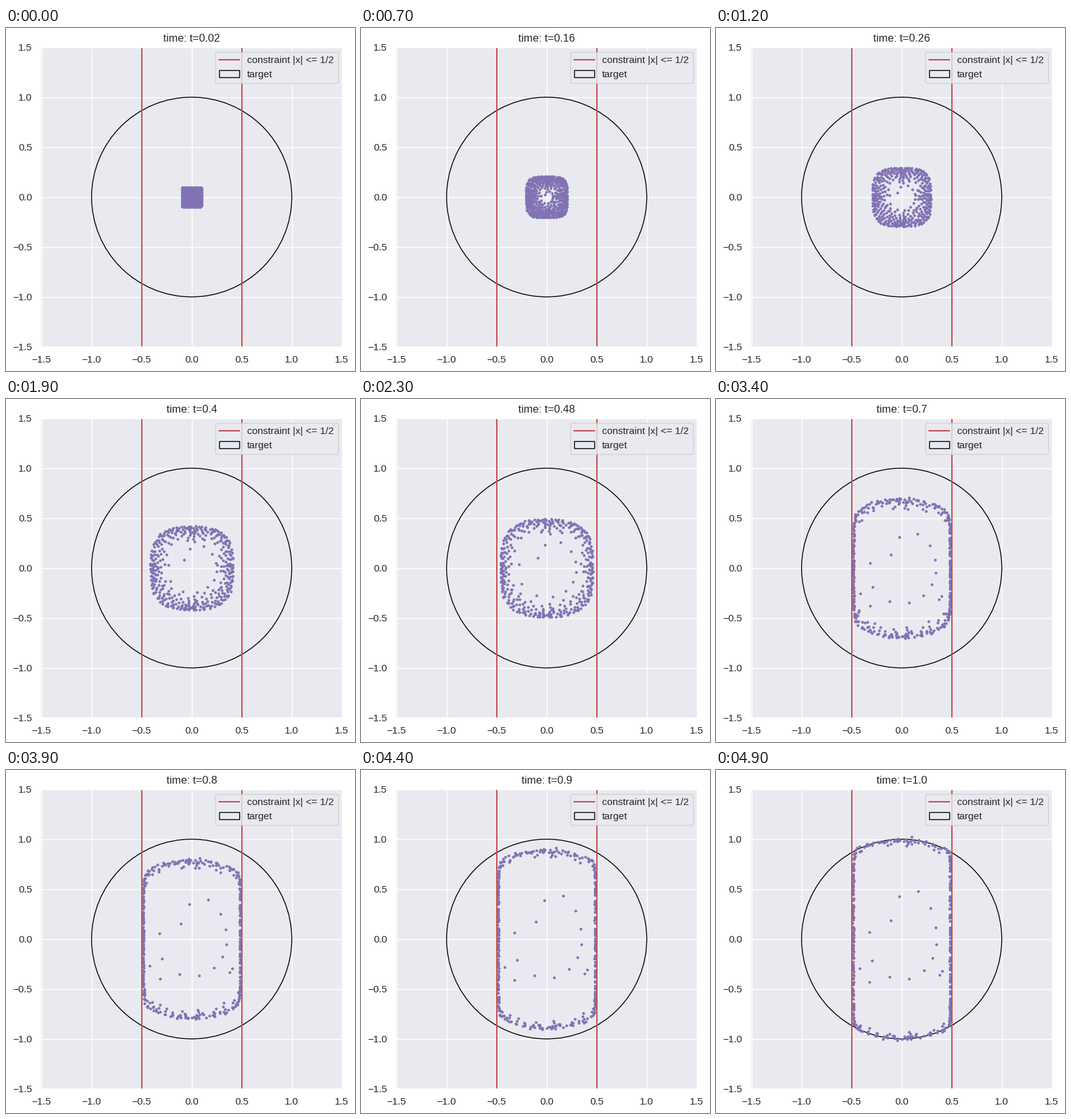
These frames come from a looping animation (537x529 px, 5000 ms). A matplotlib script:

```python
import numpy as np
import matplotlib.pyplot as plt
from matplotlib.animation import FuncAnimation

WIDTH, HEIGHT, DPI = 537, 529, 100
FRAMES, INTERVAL = 50, 100
INK, PANEL, RED, PURPLE = "#262626", "#E9EAF0", "#C44E52", "#8172B3"

plt.rcParams.update({
    "font.family": "Liberation Sans",
    "text.color": INK,
    "xtick.color": INK,
    "ytick.color": INK,
})

# Swarm: a 20 x 20 grid whose outer cells fan out into an expanding front.
side = np.linspace(-1, 1, 20)
gx, gy = (g.ravel() for g in np.meshgrid(side, side))
depth = np.maximum(abs(gx), abs(gy))
outer = depth > 0.2
depth, angle = depth[outer], np.arctan2(gy, gx)[outer]
rng = np.random.default_rng(7)
jitter = rng.normal(0, 1, depth.size)
turn = rng.normal(0, 0.03, depth.size) - 0.1 * np.sin(4 * angle)
lag = 1 + 0.2 * np.sin(5 * angle + 0.6)

# The 16 innermost cells lag behind: a dented ring of 12 and two wider pairs.
k = np.arange(12)
ring_angle = 30 * k + 22 + 20 * np.cos(np.radians(30 * (k - 8)))
ring_radius = 0.35 - 0.2 * np.exp(-((k - 3.8) / 0.8)**2)
inner_angle = np.radians(np.append(ring_angle, [211, 229, 321, 326]))
inner_radius = np.append(ring_radius, np.full(4, 0.49))


def front(t):
    """Superellipse growing from a square to the circle, held inside |x| < 1/2."""
    radius = 0.07 + 0.82 * t + 0.11 * t**2 + 0.02 * np.exp(-30 * t)
    power = 2 + 3.8 * np.exp(-3.6 * t) + 40 * np.exp(-40 * t)
    theta = angle + turn * (1 - np.exp(-8 * (t - 0.02)))
    c, s = np.cos(theta), np.sin(theta)
    norm = (abs(c)**power + abs(s)**power)**(1 / power)
    spread = depth**(np.exp(-3.2 * (t - 0.02)) * lag**min(1, 4 * t))
    r = radius * spread / norm * (1 + 0.011 * t * jitter)
    x, y = r * c, r * s
    x = x / (1 + (abs(x) / 0.484)**12)**(1 / 12)
    return np.column_stack([x + 0.003 * t * np.roll(jitter, 5), y])


def inner(t):
    """Logistic growth outwards, then a slow stretch that is stronger upwards."""
    r = inner_radius / (1 + np.exp((0.31 - t) / 0.1))
    x, y = r * np.cos(inner_angle), r * np.sin(inner_angle)
    stretch = 1 + max(0, t - 0.6) * np.where(y > 0, 1.4, 0.4)
    return np.column_stack([x, y * stretch])


fig = plt.figure(figsize=(WIDTH / DPI, HEIGHT / DPI), dpi=DPI, facecolor="white")
ax = fig.add_axes([53.2 / WIDTH, 37.3 / HEIGHT, 465 / WIDTH, 462 / HEIGHT],
                  facecolor=PANEL)
half_x = 1.5 * 465 / 462
ticks = np.arange(-1.5, 1.6, 0.5)
ax.set(xlim=(-half_x, half_x), ylim=(-1.5, 1.5), xticks=ticks, yticks=ticks)
ax.set_axisbelow(True)
ax.grid(color="white", lw=1, solid_capstyle="round")
ax.tick_params(length=0, pad=9.5, labelsize=11)
for spine in ax.spines.values():
    spine.set(color="white", linewidth=1.25)

target = ax.add_patch(plt.Circle((0, 0), 1, fill=False, ec="black", lw=1,
                                 label="target"))
dots = ax.scatter([], [], s=9.5, color=PURPLE, linewidths=0)
limit = ax.axvline(-0.5, color=RED, lw=1.5, label="constraint |x| <= 1/2")
ax.axvline(0.5, color=RED, lw=1.5)
ax.legend(handles=[limit, target], loc="upper right", fontsize=11,
          facecolor=PANEL, edgecolor="0.8", framealpha=0.8)
title = ax.set_title("", fontsize=12, pad=6)


def update(i):
    t = round(0.02 * (i + 1), 2)
    dots.set_offsets(np.vstack([front(t), inner(t)]))
    title.set_text(f"time: t={t}")
    return dots, title


anim = FuncAnimation(fig, update, frames=FRAMES, interval=INTERVAL,
                     repeat=True, repeat_delay=0)
plt.show()
```
